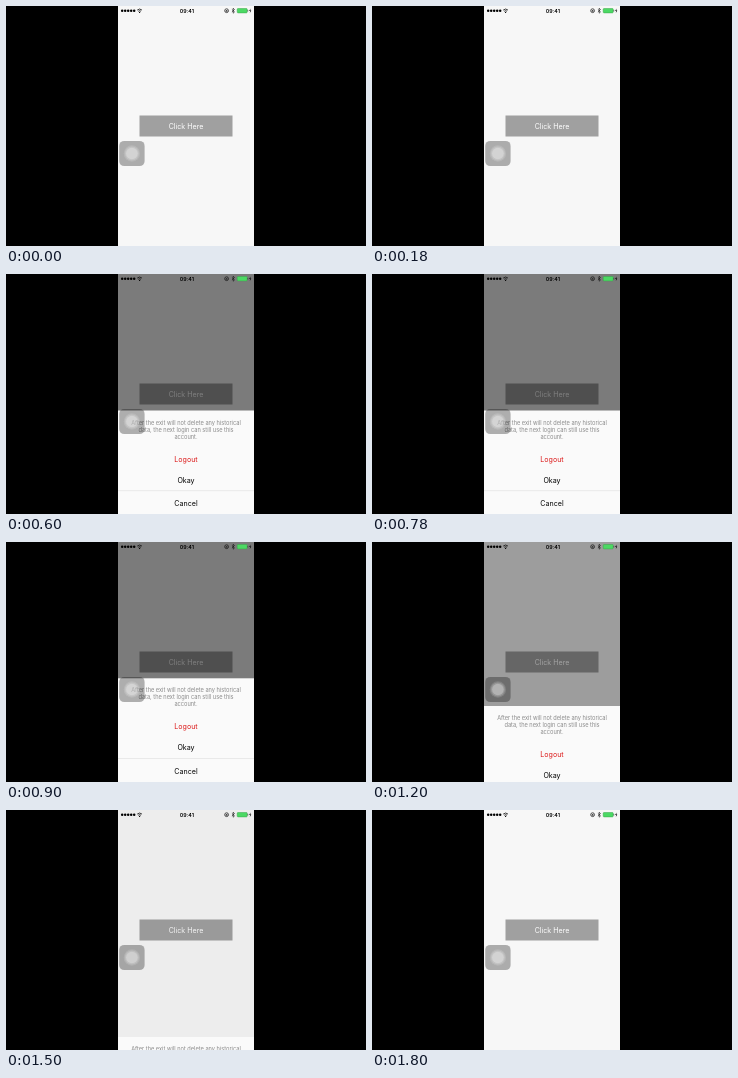
These frames come from a looping animation (360x240 px, 2.1 s). An HTML page:

```html
<!DOCTYPE html>
<html lang="en">
<head>
<meta charset="utf-8">
<title>Action sheet</title>
<style>
  html, body { margin: 0; width: 100%; height: 100%; overflow: hidden; background: #000; }
  svg { display: block; width: 100vw; height: 100vh; }
  text { font-family: Inter, "Liberation Sans", sans-serif; text-anchor: middle; }
  .label { font-size: 7.1px; }
  .note { font-size: 5.65px; fill: #8a8a8a; }
  .clock { font-size: 5.3px; font-weight: 600; }
</style>
</head>
<body>
<svg viewBox="0 0 360 240">
  <defs>
    <clipPath id="screen"><rect x="112" width="136" height="240"/></clipPath>
  </defs>
  <rect width="360" height="240"/>
  <g clip-path="url(#screen)">
    <rect x="112" width="136" height="240" fill="#f7f7f7"/>
    <rect x="133.5" y="109.5" width="93" height="21" fill="#a0a0a0"/>
    <text class="label" x="180" y="122.7" fill="#fff">Click Here</text>

    <rect id="dim" x="112" width="136" height="240" opacity="0"/>

    <g id="sheet">
      <rect x="112" width="136" height="120" fill="#fafafa"/>
      <g class="note">
        <text x="180" y="14">After the exit will not delete any historical</text>
        <text x="180" y="21">data, the next login can still use this</text>
        <text x="180" y="28">account.</text>
      </g>
      <text class="label" x="180" y="51.2" fill="#dc1a1a">Logout</text>
      <text class="label" x="180" y="72.2">Okay</text>
      <path d="M112 80.2h136" stroke="#e2e2e2" stroke-width=".7"/>
      <text class="label" x="180" y="95.6">Cancel</text>
    </g>

    <!-- status bar -->
    <g id="signal"></g>
    <g fill="none" stroke="#111" stroke-width=".8">
      <path d="M131.2 4.1q2.4-2.2 4.8 0M132.2 5.3q1.4-1.2 2.8 0"/>
      <circle cx="220.6" cy="4.7" r="1.9" stroke-width=".7"/>
      <path d="M225.9 3.4l2.6 2.5-1.3 1.3V2.2l1.3 1.3-2.6 2.5" stroke-width=".6"/>
    </g>
    <circle cx="133.6" cy="6.4" r=".6"/>
    <rect x="219.8" y="4.2" width="1.6" height="1.4" fill="#222"/>
    <text class="clock" x="180.8" y="6.6">09:41</text>
    <rect x="231.2" y="2.5" width="10" height="4.4" rx=".8" fill="#4cd964" stroke="#39a54a" stroke-width=".5"/>
    <path d="M241.8 3.9v1.6" stroke="#333" stroke-width=".6"/>
    <path d="M244.5 2.6l-1.3 2.4h1l-.4 1.9 1.5-2.5h-1z"/>

    <!-- floating touch button -->
    <rect x="113.2" y="134.9" width="25.4" height="25.2" rx="5" fill-opacity=".3"/>
    <g fill="#fff">
      <circle cx="125.9" cy="147.5" r="8.2" fill-opacity=".14"/>
      <circle cx="125.9" cy="147.5" r="7" fill-opacity=".18"/>
      <circle cx="125.9" cy="147.5" r="5.8" fill-opacity=".26"/>
    </g>
  </g>
</svg>
<script>
  const STEP = 300;
  // The sheet moves in held steps: top edge and backdrop opacity.
  const poses = [
    { top: 240, dim: 0 },
    { top: 177, dim: 0.295 },
    { top: 136.5, dim: 0.5 },
    { top: 136.3, dim: 0.5 },
    { top: 164, dim: 0.365 },
    { top: 227, dim: 0.04 },
    { top: 240, dim: 0 }
  ];
  const byId = id => document.getElementById(id);
  const sheet = byId("sheet");
  const dim = byId("dim");

  byId("signal").innerHTML = Array.from({ length: 5 }, (_, i) =>
    `<circle cx="${116.2 + i * 3}" cy="4.7" r="1.25"/>`).join("");

  function render(time) {
    const pose = poses[Math.floor(time / STEP) % poses.length];
    sheet.setAttribute("transform", `translate(0 ${pose.top})`);
    dim.setAttribute("opacity", pose.dim);
  }

  const start = performance.now();
  function tick() {
    render(performance.now() - start);
    requestAnimationFrame(tick);
  }
  tick();
</script>
</body>
</html>
```
